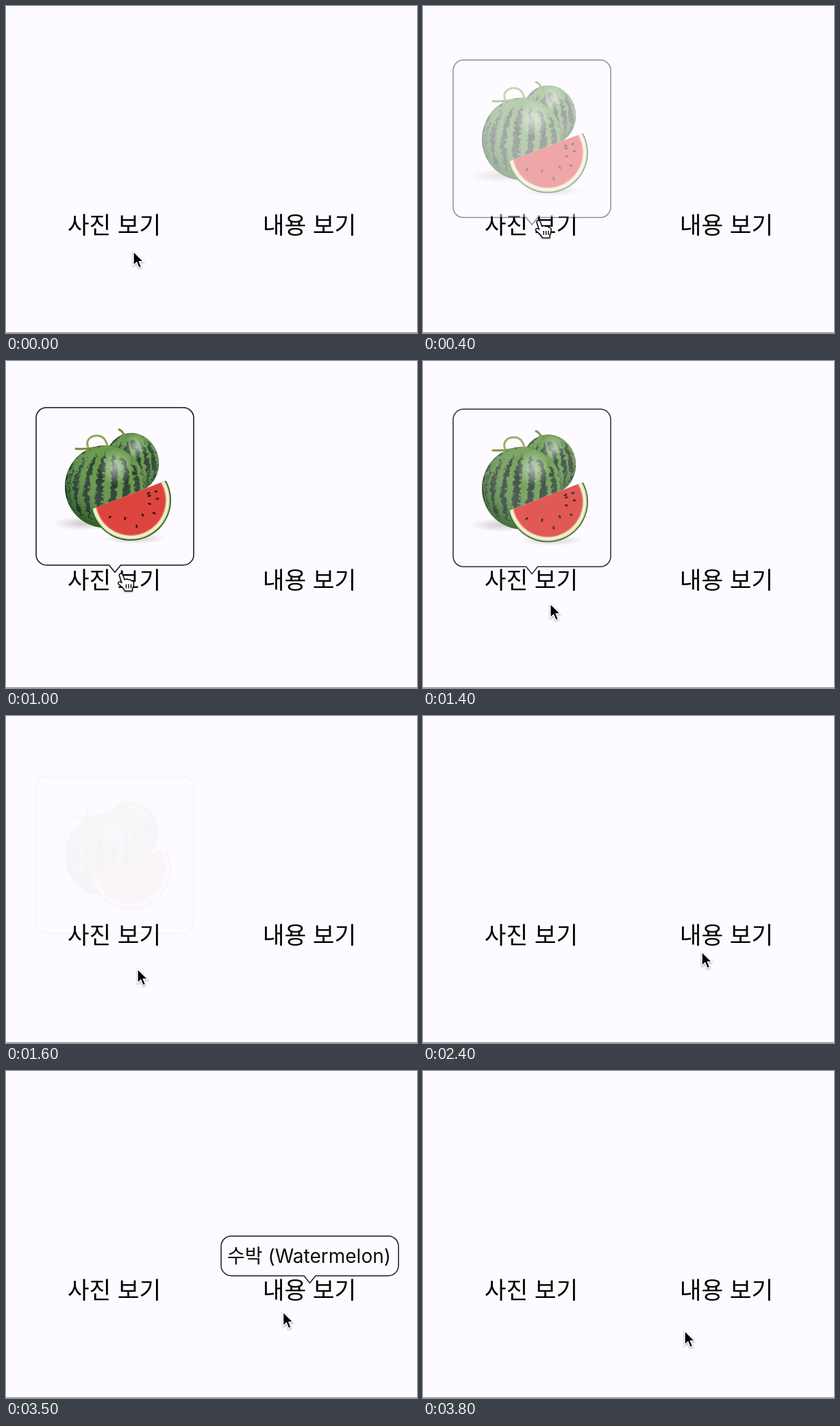
Write an HTML page that moves like this. It is 600 px wide and 477 px high and loops after 4200 ms.

```html
<!DOCTYPE html>
<html lang="ko">
<head>
<meta charset="utf-8">
<title>Tooltip</title>
<style>
  html, body { margin: 0; width: 100%; height: 100%; overflow: hidden; background: #fdfbff; }
  svg { display: block; }
  text { text-anchor: middle; font-family: "Noto Sans CJK KR", "Noto Sans CJK", sans-serif; }
  .label { font-size: 34.5px; font-weight: 500; }
  .note { font-size: 28px; font-family: Inter, "Noto Sans CJK KR", "Noto Sans CJK", sans-serif; }
  .bubble { fill: #fdfbff; stroke: #111; stroke-width: 1.5; }
  .cursor { filter: drop-shadow(0 1.5px 1.2px rgba(0, 0, 0, .4)); }
</style>
</head>
<body>
<svg width="600" height="477" viewBox="0 0 600 477">
  <defs>
    <radialGradient id="shade" cx=".62" cy=".25" r=".75">
      <stop offset="0" stop-color="#fff" stop-opacity=".6"/>
      <stop offset=".3" stop-color="#fff" stop-opacity=".05"/>
      <stop offset="1" stop-color="#021" stop-opacity=".45"/>
    </radialGradient>
    <radialGradient id="ground">
      <stop offset="0" stop-color="#8a8078" stop-opacity=".4"/>
      <stop offset="1" stop-color="#8a8078" stop-opacity="0"/>
    </radialGradient>
    <clipPath id="round"><circle r="1"/></clipPath>
    <filter id="rough">
      <feTurbulence baseFrequency=".12" numOctaves="2" seed="4"/>
      <feDisplacementMap in="SourceGraphic" scale="10" xChannelSelector="R" yChannelSelector="G"/>
    </filter>
  </defs>

  <text class="label" x="158" y="331.5">사진 보기</text>
  <text class="label" x="443" y="331.5">내용 보기</text>
  <path d="M0 476.5H600" stroke="#858487"/>

  <g id="photo">
    <path class="bubble"/>
    <ellipse cx="112" cy="237" rx="44" ry="10" fill="url(#ground)"/>
    <ellipse cx="188" cy="259" rx="46" ry="8" fill="url(#ground)"/>
    <g id="melons"></g>
    <g fill="none" stroke="#6f8a3d" stroke-width="3" stroke-linecap="round">
      <path d="M165 100q5 2 6 6l5 3M102 128q14 1 31-2"/>
      <path d="M120 126C115 115 125 108 134 109S146 116 148 123" stroke="#8fa656"/>
    </g>
    <g id="slice" transform="translate(182 203) rotate(-21)"></g>
  </g>

  <g id="note">
    <path class="bubble"/>
    <text class="note" x="442.5" y="278.5">수박 (Watermelon)</text>
  </g>

  <g id="arrow" class="cursor">
    <path d="M0 0V20.5L4.8 16L8 24L11.7 22.5L8.5 14.8H14.8Z" stroke="#fff" stroke-width="1.5"/>
  </g>
  <g id="hand" class="cursor" stroke="#000" stroke-width="1.4" stroke-linejoin="round">
    <path d="M-2.5 2C-3-1.5 1.500-2 2.500 1L5 8q4-2 5 0q4-1 4.500 1.500q4 0 4 3q0 5-2 8.500v3.500h-11q-1-4-9-10c-2-3 1-5 4.500-2z" fill="#fff"/>
    <path d="M7.500 14.500v6m3.500-6v6m3.500-6v6"/>
  </g>
</svg>
<script>
const $ = id => document.getElementById(id);
const LOOP = 4200, STEP = 100, FADE = 300, DROP = 20;
const BOTTOM = 297.7, RADIUS = 15;

const tips = [
  { id: "photo", left: 44, right: 274, top: 68, enter: 318, leave: 1366 },
  { id: "note", left: 314, right: 573, top: 239.7, enter: 2420, leave: 3480 }
];

// Cursor rests: time, x, y
const stops = [
  [0, 186, 358], [450, 168, 312], [1000, 168, 311], [1600, 192, 369],
  [2400, 407, 344], [2700, 427, 324], [3200, 427, 324], [3800, 382, 379]
];

function bubble({ left, right, top }) {
  const r = RADIUS, arc = (dx, dy) => `a${r} ${r} 0 0 1 ${dx} ${dy}`;
  return `M${left + r} ${top}H${right - r}${arc(r, r)}V${BOTTOM - r}${arc(-r, r)}
    H${(left + right) / 2 + 8.5}l-8.5 10.5l-8.5-10.5H${left + r}${arc(-r, -r)}V${top + r}${arc(r, -r)}z`;
}

function melon(cx, cy, rx, ry, tilt) {
  let bands = "";
  for (let lon = -1.4; lon <= 1.4; lon += .35) {
    const bend = Math.sin(lon) * rx * 4 / 3;
    bands += `<path d="M0 ${-ry}C${bend} ${-ry} ${bend} ${ry} 0 ${ry}"
      stroke-width="${rx * (.04 + .13 * Math.cos(lon))}"/>`;
  }
  return `<g transform="translate(${cx} ${cy}) rotate(${tilt})">
    <ellipse rx="${rx}" ry="${ry}" fill="#1f3326"/>
    <g clip-path="url(#round)" transform="scale(${rx} ${ry})">
      <g transform="scale(${1 / rx} ${1 / ry})">
        <g filter="url(#rough)" fill="none" stroke="#5d9340">${bands}</g>
      </g>
    </g>
    <ellipse rx="${rx}" ry="${ry}" fill="url(#shade)"/></g>`;
}

// Circle cut off by a chord above its centre
function segment(r, fill) {
  const x = Math.sqrt(r * r - 64);
  return `<path d="M${-x} -8A${r} ${r} 0 1 0 ${x} -8z" fill="${fill}"/>`;
}

function seed(i) {
  const turn = 2 * i * i, r = i % 2 ? 39 : 28;
  return `<ellipse cx="${r}" rx="2.6" ry="1.5" fill="#3a1714" transform="rotate(${turn})"/>`;
}

for (const tip of tips) $(tip.id).querySelector(".bubble").setAttribute("d", bubble(tip));
$("melons").innerHTML = melon(184, 148, 39, 43, -10) + melon(144.5, 183, 58.5, 60, 4);
$("slice").innerHTML = segment(59, "#284d22") + segment(57.5, "#b9cf7c") + segment(56, "#eef0cf")
  + segment(52, "#ef8578") + segment(50.5, "#de443e")
  + Array.from({ length: 10 }, (_, i) => seed(i)).join("");

// cubic-bezier(.25, .1, .25, 1)
function ease(x) {
  if (x <= 0 || x >= 1) return x <= 0 ? 0 : 1;
  const curve = (u, a, b) => 3 * a * u * (1 - u) ** 2 + 3 * b * u * u * (1 - u) + u ** 3;
  let lo = 0, hi = 1;
  for (let i = 0; i < 20; i++) {
    const mid = (lo + hi) / 2;
    if (curve(mid, .25, .25) < x) lo = mid; else hi = mid;
  }
  return curve(lo, .1, 1);
}

function cursorAt(t) {
  const i = stops.findLastIndex(s => s[0] <= t);
  const [t0, x0, y0] = stops[i], [t1, x1, y1] = stops[i + 1] || [LOOP, x0, y0];
  const k = (t - t0) / (t1 - t0), s = k * k * (3 - 2 * k);
  return [x0 + (x1 - x0) * s, y0 + (y1 - y0) * s];
}

function draw(now) {
  const t = Math.floor(now % LOOP / STEP) * STEP;
  let over = false;
  for (const { id, enter, leave } of tips) {
    const shown = ease((t - enter) / FADE) - ease((t - leave) / FADE);
    $(id).setAttribute("opacity", shown);
    $(id).setAttribute("transform", `translate(0 ${DROP * (1 - shown)})`);
    over ||= t >= enter && t < leave;
  }
  const place = `translate(${cursorAt(t)})`;
  for (const id of ["arrow", "hand"]) {
    $(id).setAttribute("transform", place);
    $(id).setAttribute("visibility", (id === "hand") === over ? "visible" : "hidden");
  }
}

const start = performance.now();
function tick() {
  draw(performance.now() - start);
  requestAnimationFrame(tick);
}
tick();
</script>
</body>
</html>
```
